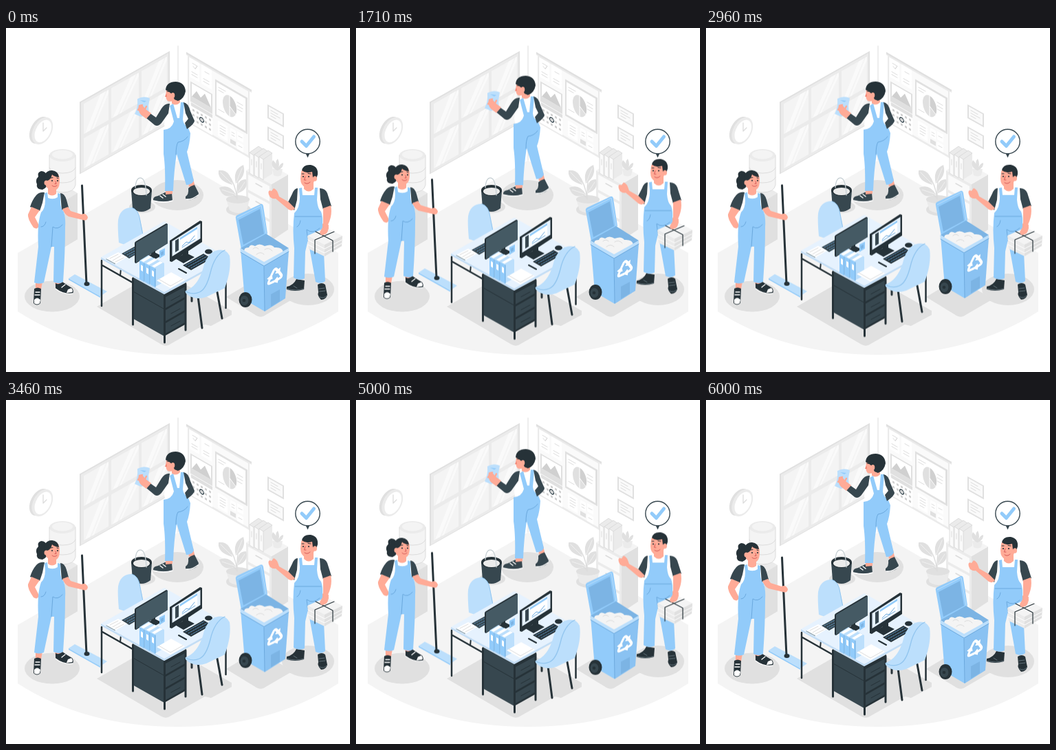
Recreate the animation shown at these times as an HTML page. Size 500 px wide and 500 px high, loop 6040 ms.

```html
<!DOCTYPE html>
<html lang="en">
<head>
<meta charset="utf-8">
<title>Office cleaning</title>
<style>
html,body{margin:0;width:100%;height:100%;overflow:hidden;background:#fff}
svg{display:block;width:100vw;height:100vh}
.b{fill:#92cbfa}.bl{fill:#bcdffc}.bd{fill:#7cb4e4}.bp{fill:#e6f2fe}
.d{fill:#37474f}.k{fill:#263238}.s{fill:#ffab97}.sd{fill:#f28574}
.w{fill:#fff}.g1{fill:#fafafa}.g2{fill:#f4f4f4}.g3{fill:#ebebeb}.g4{fill:#e0e0e0}.g5{fill:#d0d0d0}
.l{fill:none;stroke-linecap:round;stroke-linejoin:round}
.lk{stroke:#263238}.lg{stroke:#dcdcdc}.lw{stroke:#fff}.lb{stroke:#6ba9de}.ls{stroke:#ffab97}
</style>
</head>
<body>
<svg viewBox="0 0 500 500">
<!-- room -->
<path class="g2" d="M17 327 250 192.500 483 327V412Q385 475 250 475T17 412Z"/>
<path class="l lg" d="M250 26V192"/>
<g transform="matrix(1 -.566 0 1 108 107)" id="window">
  <path class="g4" d="M-1 0H130V105H-1Z"/><path class="g3" d="M1 2H128V104H1Z"/>
</g>
<g transform="matrix(1 .578 0 1 262 35)" id="board">
  <path class="g3" d="M0 0H95V4H92V101H2V4H0Z"/><path class="g1" d="M4 5H90V98H4Z"/>
  <path class="g4" d="M0 0H95V2.500H0Z"/>
  <path class="w" d="M5 5H19V33H5ZM22 5H37V33H22ZM5 73H38V99H5Z"/>
  <path class="g4" d="M6 39H38V68H6Z"/><path class="w" d="M8 41H36V60H8Z"/>
  <path class="g5" d="M8 60 15 48 21 54 27 45 36 60Z"/>
  <path class="g4" d="M42 15H89V68H42Z"/><path class="w" d="M44 18H86V65H44Z"/>
  <path class="l lg" d="M9 11H15M10 15 13 17 16 11M27 13H33M8 24H16M8 28H16M25 24H33M25 28H33M47 24H57M47 28H54M47 56H55M74 30H82M74 35H82M74 40H81"/>
  <ellipse class="g4" cx="63" cy="42" rx="10" ry="15"/><path class="g5" d="M63 42V27A10 15 0 0 1 72 49Z"/>
  <path class="l lw" d="M63 27V57M63 42 72 49"/>
  <path class="w" d="M46 73H60V95H46ZM64 73H72V86H64ZM74 72H83V84H74ZM74 87H83V98H74Z"/>
  <path class="l lg" d="M49 78H57M49 82H57M49 86H57M49 90H55M66 78H70M66 82H70M76 78H81M76 92H81"/>
  <path class="g4" d="M64 89H72V95H64ZM7 69H38V74H7Z"/>
</g>
<g id="frames"></g>
<!-- clock -->
<g transform="rotate(27 52 149)">
  <ellipse class="g4" cx="49" cy="150" rx="13" ry="21"/><ellipse class="g3" cx="53" cy="149" rx="13.500" ry="21"/>
  <ellipse class="w" cx="54" cy="149" rx="10.500" ry="17.500"/>
</g>
<path class="l lg" stroke-width="1.300" d="M54 138V150L59 145"/>
<!-- water cooler -->
<path class="g3" d="M56 243 84 228 104 240V307L84 319 56 303Z"/><path class="g4" d="M84 252 104 240V307L84 319Z"/>
<path class="g2" d="M63 184V228Q65 239 82 239T101 228V184Z"/>
<ellipse class="g3" cx="82" cy="185" rx="19" ry="9"/><ellipse class="g2" cx="82" cy="184" rx="15" ry="6.500"/>
<path class="l lg" d="M63 185V228Q65 239 82 239T101 228V185M63 203Q66 211 82 211T101 203M63 217Q66 225 82 225T101 217"/>
<!-- cabinet -->
<path class="g3" d="M349 207 386 227V310L349 289Z"/><path class="g4" d="M386 227 410 213V293L386 309Z"/>
<path class="g2" d="M349 207 373 193 410 213 386 227Z"/>
<path class="g1" d="M352 213 383 230V252L352 235ZM352 239 383 256V278L352 261ZM352 265 383 282V303L352 286Z"/>
<path class="l lg" stroke-width="1.500" d="M363 226 372 231M363 252 372 257M363 278 372 283"/>
<g id="books"></g>
<path class="g3" d="M387 205H402L400 214Q394 217 389 214Z"/>
<path class="g4" d="M394 207Q383 201 388 192 395 198 394 207 390 194 395 190 399 198 395 207 397 197 403 196 404 203 395 207Z"/>
<!-- plant -->
<ellipse class="g4" cx="338" cy="264" rx="18" ry="9"/>
<path class="g3" d="M320 249H354L350 265Q338 273 325 265Z"/><ellipse class="g4" cx="337" cy="249" rx="17" ry="6"/>
<path class="l lg" stroke-width="1.300" d="M336 249Q334 226 321 211M336 247Q335 222 342 204M336 248Q329 239 317 237"/>
<path class="g4" d="M334 226Q329 206 345 199 350 215 334 226ZM329 228Q307 222 309 207 326 205 329 228ZM334 242Q315 250 310 232 325 226 334 242ZM337 240Q334 220 349 220 353 235 337 240Z"/>
<path class="l" stroke="#f0f0f0" d="M335 224 343 204M328 226 312 210M332 241 314 235M338 238 347 224"/>
<!-- floor shadows -->
<g class="g4">
  <ellipse cx="67" cy="390" rx="40" ry="22.500"/><ellipse cx="249" cy="243" rx="38" ry="22"/>
  <ellipse cx="439" cy="380" rx="38" ry="23"/>
  <path d="M132 405 224 352 328 411V417L298 433 289 431 236 461Q231 463 226 460Z"/>
  <path d="M320 391 365 364 417 394 374 419Q369 421 364 418Z"/>
  <ellipse cx="198" cy="260" rx="19" ry="9"/>
</g>
<!-- bucket -->
<path class="d" d="M182 236H212L210 262Q197 272 184 262Z"/><ellipse class="k" cx="197" cy="236" rx="15" ry="8"/>
<ellipse class="g3" cx="197" cy="237.500" rx="12" ry="5.500"/>
<path class="l" stroke="#c7d0d4" stroke-width="1.300" d="M188 232Q189 217 196 218T204 243"/>
<!-- window cleaner -->
<g class="bob">
  <path class="d" d="M214 249Q214 245 221 244L231 239 241 240 242 251Q230 254 214 251ZM261 245Q266 242 265 233L273 226 280 240Q279 246 272 248 263 252 261 248Z"/>
  <path class="l lw" stroke-width="1.500" d="M214 251Q230 255 242 251M262 249Q270 250 279 243M224 244 228 247M228 242 232 245"/>
  <path class="s" d="M232 232H242V241L232 242ZM264 221 272 218 274 228 266 231Z"/>
  <path class="w" d="M234 113 244 108H257Q263 114 264 128L263 147 232 152 230 140Z"/>
  <path class="s" d="M241 97H253V108Q248 114 241 110Z"/>
  <path class="s" d="M233 90Q231 103 235 106 240 108 246 105L249 90Z"/>
  <path class="k" d="M232 90Q233 78 247 78 260 79 261 92 259 103 250 106L245 104 241 96 236 92Z"/>
  <ellipse class="s" cx="242.500" cy="98" rx="2.800" ry="4"/><path class="sd" d="M233 95 231 100 234 100Z"/>
  <path class="l lk" d="M234 92 237 92.500"/>
  <path class="b" d="M229 148Q241 147 244 136L238 113 243 110 249 131 252 131 254 108 259 108 257 133Q258 141 264 143L268 153Q267 170 263 180L273 222Q270 228 262 228L248 183Q244 208 243 237L231 237Q232 203 229 183Z"/>
  <path class="l lb" d="M264 158Q259 165 250 166Q247 171 247 184"/>
  <path class="d" d="M258 108Q265 109 268 121L274 135Q274 139 263 147L260 138 265 132 261 124Z"/>
  <path class="d" d="M238 110Q231 109 226 117L218 130 208 123 204 131 216 141Q221 144 226 138L236 124Z"/>
  <path class="bl" d="M191 103Q200 98 209 102L207 113 208 126 196 129 187 125Q192 116 191 103Z"/>
  <path class="b" d="M195 105 204 106 201 108Z"/>
  <path class="s" d="M211 124 204 132 196 126Q191 120 193 112L197 111 203 118Z"/>
  <path class="l ls" stroke-width="2.500" d="M195 115 192 119M198 112 194 117M201 120 204 114"/>
</g>
<!-- mop cleaner -->
<g class="bob">
  <path class="bl" d="M91 364 100 358 147 383 137 390Z"/><path class="b" d="M91 364 137 390V392L91 366Z"/>
  <path class="l lk" stroke-width="3" d="M110.500 229 117 372"/><ellipse class="k" cx="117.500" cy="372" rx="4" ry="3"/>
  <path class="s" d="M43 363H54L51 380H43ZM70 360H82L82 374 72 375Z"/>
  <path class="k" d="M41 379Q46 376 51 379L50 400Q45 405 40 400ZM72 371Q77 374 82 369 89 374 96 378 99 382 97 386 84 388 72 379Z"/>
  <path class="w" d="M41 395Q45 390 50 395L49 400Q45 403 41 400ZM90 380 95 378Q98 382 96 384L88 385Z"/>
  <path class="l lw" stroke-width="1.300" d="M72 379Q84 388 97 386M81 377 86 373M43 384H49M42 388H49"/>
  <path class="w" d="M54 240Q67 235 80 241L86 265 83 279 50 282 50 254Z"/>
  <path class="d" d="M56 239Q49 238 44 243 38 250 35 260L49 266 53 254ZM79 240Q85 240 88 250L91 261 81 265Z"/>
  <path class="s" d="M37 260 49 265 42 275 48 287Q46 294 40 290 31 277 32 271ZM82 263 90 260 94 266 110 271Q116 268 119 275 118 281 112 279L91 274Q84 270 82 263Z"/>
  <path class="s" d="M61 231H73V241Q67 246 61 241Z"/>
  <path class="k" d="M60 220Q60 208 51 208 45 210 47 216 42 221 45 227 43 234 53 235 60 232 61 225Z"/>
  <path class="s" d="M57 217Q57 211 65 210H73Q78 212 78 222 78 235 70 236 62 236 58 230Z"/>
  <path class="k" d="M56 226Q53 207 67 207 76 208 77 217 70 216 67 213 65 221 60 222Z"/>
  <ellipse class="s" cx="58.500" cy="225" rx="3" ry="3.500"/>
  <circle class="k" cx="67" cy="222" r="1.100"/><circle class="k" cx="75" cy="222" r="1.100"/>
  <path class="l lk" d="M65 218 68 217.500M74 218 76 218.500"/>
  <path class="l" stroke="#d65b58" d="M72 223 73 226.500H71M67 229Q70 232 74 229"/>
  <path class="b" d="M56 240 60 239 61 247Q69 250 75 246L75 240 79 241 79 252Q79 263 84 267 87 277 86 290 86 327 83 369 77 373 69 369L70 318 66 318 55 370Q48 373 41 370L47 318Q45 284 51 268 57 263 57 250Z"/>
  <path class="l lb" d="M82 286Q75 294 68 289L66 318M51 289Q56 289 58 282"/>
</g>
<!-- box carrier -->
<g class="bob">
  <path class="k" d="M408 376Q418 374 422 365L434 367 433 380Q420 384 408 380ZM453 373Q459 369 464 373L467 388Q465 395 458 395 452 389 454 384Z"/>
  <path class="l" stroke="#607078" d="M408 379Q422 383 433 379M455 379 463 378M455 383 464 382M456 391Q462 394 466 389M418 375 423 378"/>
  <path class="w" d="M423 235Q439 228 458 235L460 272H419Z"/>
  <path class="d" d="M424 233Q419 233 416 241L409 255 419 265 423 250ZM456 233Q464 233 467 240L473 259 461 264 457 249Z"/>
  <path class="s" d="M411 253 420 262Q417 267 411 264L392 248Q384 249 382 242 380 234 386 237L389 233Q394 234 397 245ZM461 262 472 258Q475 271 468 286L470 297 461 301 456 295 461 283Z"/>
  <path class="s" d="M433 224H447V234Q440 241 433 234Z"/>
  <path class="s" d="M429 209Q432 202 443 204 451 208 449 219 446 232 436 232 428 229 428 219Z"/>
  <path class="k" d="M430 207Q432 198 443 199 454 201 453 213L450 222 446 217 445 209Q436 212 430 207Z"/>
  <ellipse class="s" cx="449" cy="219" rx="3" ry="3.700"/>
  <circle class="k" cx="432" cy="216" r="1.100"/><circle class="k" cx="440" cy="216" r="1.100"/>
  <path class="l lk" d="M430 212 433 212M439 211.500 443 212"/>
  <path class="l" stroke="#d65b58" d="M435 216 433.500 221H436M434 225Q438 228 442 224"/>
  <path class="b" d="M426 233 430 232 431 243H448L449 232 453 232 452 250Q453 263 458 267 461 275 460 286L464 368Q458 373 450 369L443 330 439 308 435 325 434 364Q426 368 418 363L419 320Q416 293 419 269 427 262 427 246Z"/>
  <path class="l lb" d="M420 274H458M423 289Q427 287 428 280M456 291Q446 300 437 293L439 310"/>
  <path class="g2" d="M438 302 465 290 489 302 463 316Z"/><path class="g3" d="M438 302 463 315V332L440 321Z"/><path class="g4" d="M463 315 489 302 488 317 463 332Z"/>
  <path class="l lw" d="M439 308 463 321 488 308M439 315 463 327 488 313"/>
  <path class="l lk" stroke-width="1.200" d="M449 328V308L477 296M475 325V309L450 296"/>
  <path class="s" d="M461 288 469 286Q469 299 463 300 457 303 456 297Z"/>
</g>
<!-- speech bubble -->
<path class="d" d="M435 181H442L438.500 188.500Z"/><circle class="w" cx="438.500" cy="165" r="17.700" stroke="#37474f" stroke-width="1.400"/>
<path class="l" stroke="#92cbfa" stroke-width="5" d="M430 165 436.500 171.500 447.500 158"/>
<!-- desk with chairs -->
<g id="desk">
  <path class="bl" d="M164 312Q162 289 163 279 166 262 181 261 192 262 195 279L201 307 181 318Z"/>
  <path class="l" stroke="#91c5ef" d="M183 261Q193 264 195 280L200 306"/>
  <path class="l lk" stroke-width="2" d="M167 350 166 360"/>
  <path class="l lk" stroke-width="2.500" d="M139 338V404M140 345 184 370M319.500 342V407"/>
  <path class="d" d="M184 362 230 387V448L184 422Z"/><path class="k" d="M230 387 262 370V430L230 448Z"/>
  <path class="d" d="M232 391 260 376V391L232 407ZM232 410 260 394V410L232 426ZM232 429 260 413V428L232 444Z"/>
  <path class="l lk" d="M240 396 253 389M240 415 253 408M240 433 253 426M185 383 229 408"/>
  <path class="l lk" stroke-width="3" d="M184.500 364V431M230.500 388V457M261 372V439"/>
  <path fill="#c3ddf5" d="M138 333 230 383 322 333V336L230 387 138 336Z"/>
  <path class="bp" d="M138 333 230 281 322 333 230 384Z"/>
  <!-- left workplace -->
  <path class="d" d="M168 328 190 316 201 322 179 335Z"/><path class="l lb" stroke-dasharray="2 1.500" stroke-width=".8" d="M172 328 191 318M176 330 195 320M179 332 198 322"/>
  <path class="w" d="M146 335 163 326 176 333 159 343Z"/><path class="l lg" d="M151 335 163 329M155 338 167 331M159 340 171 334"/>
  <path class="l" stroke="#90a4ae" stroke-width="1.300" stroke-dasharray="1.500 1" d="M146 336 159 343"/>
  <path class="k" d="M203 333 216 326 226 331 213 338ZM211 319H217V333H211Z"/>
  <path class="k" d="M187 313Q187 311 189 310L233 284 235 285V313L189 342Q187 342 187 340Z"/><path fill="#455a64" d="M189 312 235 285V313L189 341Z"/>
  <!-- binders -->
  <g id="binders"></g>
  <path class="b" d="M223 324 231 320V330L223 335Z"/><path class="bd" d="M225 326 229 324V329L225 331Z"/>
  <!-- right workplace -->
  <path class="k" d="M246 335 262 327 274 333 258 342ZM257 319 265 315V332L257 335Z"/>
  <path class="k" d="M238 309 282 280 285 281V311L241 340 238 339Z"/><path class="bp" d="M241.500 310 282.500 284V306L241.500 332Z"/>
  <path class="d" d="M246 309 251 306V323L246 326Z"/><path class="w" d="M253 305 278 289V307L253 323Z"/><path class="b" d="M253 305 278 289V292L253 308Z"/>
  <path class="l lb" d="M256 317 262 311 266 312 274 302M256 319 275 307"/>
  <path class="k" d="M257 345 287 328 299 335 269 352Z"/><path class="l lb" stroke-dasharray="2.500 1.300" stroke-width=".8" d="M261 345 288 330M265 347 292 332M269 349 296 334"/>
  <ellipse class="k" cx="294.500" cy="325" rx="5.500" ry="3.500"/>
  <path class="l lk" stroke-width="2" d="M251 350 262 356"/>
  <path class="w" d="M219 367 240 355 260 366 239 378Z"/><path class="l lg" d="M222 365 239 375 257 365"/>
  <!-- front chair -->
  <path class="l lk" stroke-width="3" d="M270 385V397M279 390 285 436M307 384 314 422"/>
  <path class="bl" d="M261 382Q278 376 286 351 291 329 304 324 319 319 325 331 328 351 318 378L291 391Q273 397 261 385Z"/>
  <path class="l" stroke="#91c5ef" stroke-width="1.300" d="M261 383Q272 388 281 384 291 380 297 356 303 330 318 323"/>
</g>
<!-- recycling bin -->
<g id="bin">
  <path class="b" d="M334 277Q333 274 336 272L370 256Q373 255 374 259L380 299 342 322Z"/>
  <path class="bd" d="M338 279 369 263 375 299 345 315Z"/><path class="l" stroke="#b9defc" d="M336 276 371 258 378 299"/>
  <path class="bd" d="M341 320 378 299 411 320 375 342Z"/>
  <path class="g2" d="M347 326Q344 319 353 319 355 313 362 317 368 312 376 317 386 313 390 319 402 318 403 326L376 341Z"/>
  <path class="l lg" d="M359 321Q363 317 367 321M376 322Q382 318 387 324M364 329Q370 324 375 329"/>
  <path class="b" d="M341 322 375 343 376 412 347 395Z"/><path fill="#8ac2f2" d="M375 343 411 324 406 393 376 412Z"/>
  <path class="bl" d="M340 320 375 340 411 320V325L375 346 341 326Z"/><path class="l lb" d="M341 326 375 346 411 325M375 347 376 411"/>
  <path class="bd" d="M385 387 398 380V397L385 405Z"/>
  <g transform="translate(391 361) skewY(-28)" id="recycle"></g>
  <ellipse class="k" cx="348" cy="395" rx="9.500" ry="11"/><ellipse class="d" cx="346.500" cy="396" rx="6" ry="7"/><circle class="k" cx="346" cy="396" r="2.300"/>
</g>
</svg>
<script>
const $ = id => document.getElementById(id);
const add = (id, html) => $(id).insertAdjacentHTML('beforeend', html);
const path = (cls, d) => `<path class="${cls}" d="${d}"/>`;

// window panes with slanted reflections
for (const [x, w] of [[5, 36], [45, 40], [89, 37]]) {
  for (const y of [6, 56]) {
    add('window', path('g2', `M${x} ${y}h${w}v44h${-w}Z`) +
      path('g1', `M${x + w - 12} ${y}h8L${x + 9} ${y + 44}h-7ZM${x + w - 2} ${y}h2v5L${x + 15} ${y + 44}h-3Z`));
  }
}

// calendar cells with one day ringed
for (let i = 0; i < 15; i++) {
  const x = 9 + i % 5 * 6, y = 77 + Math.floor(i / 5) * 7;
  add('board', path('g5', `M${x} ${y}h3v3h-3Z`));
}
add('board', '<circle class="l" cx="22.500" cy="85.500" r="3" stroke="#37474f" stroke-width="1.300"/>');

// wall frames
for (const y of [111, 143]) {
  add('frames', `<g transform="matrix(1 .56 0 1 380 ${y})">` + path('g4', 'M0 0H24V20H0Z') +
    path('g1', 'M2 2H22V18H2Z') + path('l lg', 'M5 6H15M5 10H18M5 14H12') + '</g>');
}

// folders on the cabinet
for (let i = 0; i < 3; i++) {
  const x = 354 + i * 7, y = 181 + i * 3;
  add('books', path('g3', `M${x} ${y}l13-9 6 4v30l-13 8Z`) + path('g1', `M${x} ${y}l6 4v30l-6-4Z`) +
    path('l lg', `M${x} ${y}l13-9 6 4-13 9-6-4v30l6 4v-30M${x + 3} ${y + 10}v8`));
}

// binders on the desk
for (let i = 0; i < 3; i++) {
  const x = 194 + i * 8, y = 338 + i * 4;
  add('binders', path('bl', `M${x} ${y}l13-8 7 4v27l-13 7Z`) + path('w', `M${x + 2} ${y}l12-7 4 2-12 7Z`) +
    path('b', `M${x} ${y}l7 4v27l-7-4Z`) + path('w', `M${x + 2} ${y + 6}l3 2v8l-3-2Z`) +
    path('l lb', `M${x + 7} ${y + 4}v26`));
}

// three bent arrows of the recycling sign
for (const turn of [0, 120, 240]) {
  add('recycle', `<g transform="rotate(${turn})">` +
    path('w', 'M-7-5-3-11Q0-14 3-11L5-8 8-9 7-1 0-4 2-6 0-9-4-3Z') + '</g>');
}

// linear up-and-down floating
const LOOP = 6040, CYCLE = 6000;
function float(el, rise, turns) {
  const steps = [];
  for (let i = 0; i <= turns * 2; i++) {
    steps.push({
      offset: i * CYCLE / (turns * 2) / LOOP,
      transform: `translateY(${i % 2 ? -rise : 0}px)`
    });
  }
  steps.push({ offset: 1, transform: 'translateY(0px)' });
  el.animate(steps, { duration: LOOP, iterations: Infinity, easing: 'linear' });
}
document.querySelectorAll('.bob').forEach(el => float(el, 10, 2));
float($('desk'), 9.5, 1);
float($('bin'), 19.5, 1);
</script>
</body>
</html>
```
